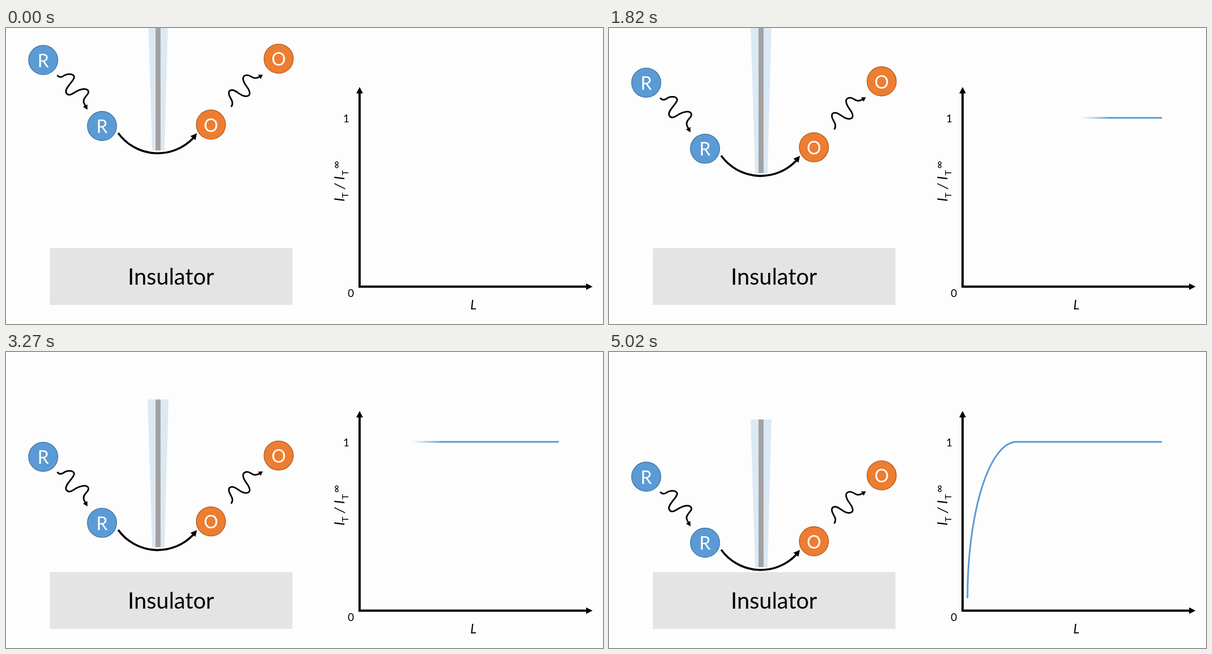
Animation, 1062 px wide and 527 px high, one loop 5.06 s. Source, as an HTML page:

```html
<!DOCTYPE html>
<html lang="en">
<head>
<meta charset="utf-8">
<title>Approach curve over an insulator</title>
<style>
  html, body { margin: 0; width: 100%; height: 100%; overflow: hidden; background: #fdfdfd; }
  svg { display: block; width: 1062px; height: 527px; font-family: Lato, "Open Sans", sans-serif; }
  .mid { text-anchor: middle; }
  .line { fill: none; stroke: #000; }
  .ball { font-size: 32px; fill: #fff; text-anchor: middle; }
  .ball circle { stroke-width: 1.3; }
  .red circle { fill: #5b9bd5; stroke: #41719c; }
  .ox circle { fill: #ed7d31; stroke: #ae5a21; }
</style>
</head>
<body>
<svg viewBox="0 0 1062 527">
  <defs>
    <linearGradient id="wipe" gradientUnits="userSpaceOnUse" y1="0" y2="0">
      <stop offset="0" stop-color="#5b9bd5" stop-opacity="0"/>
      <stop offset="1" stop-color="#5b9bd5"/>
    </linearGradient>
  </defs>

  <rect x="78" y="392" width="431.5" height="101" fill="#e4e4e4"/>
  <text class="mid" x="293.5" y="457" font-size="40">Insulator</text>

  <g id="probe">
    <path d="M252 -45H289L282 218H260Z" fill="#dbe9f4"/>
    <rect x="266" y="-45" width="9" height="263" fill="#a2a2a2"/>

    <g class="ball red" transform="translate(66.2 57)"><circle r="26"/><text y="12.5">R</text></g>
    <g class="ball red" transform="translate(170.8 174.5)"><circle r="26"/><text y="12.5">R</text></g>
    <g class="ball ox" transform="translate(364.5 172)"><circle r="26"/><text y="12.5">O</text></g>
    <g class="ball ox" transform="translate(485 54.7)"><circle r="26"/><text y="12.5">O</text></g>

    <path class="line" stroke-width="3.6" d="M199.5 187A87 87 0 0 0 333 196"/>
    <path d="M339.7 187.3L337 199.4L328 192.4Z"/>

    <path class="line" stroke-width="2.8" d="M91 84C95 89 99 88 103 85S118 80 121 86S103 107 107 115S118 117 125 113S143 106 146.3 112S135 124 138.5 133L141 138.5"/>
    <path d="M145 145.5L137 140.5L144.7 136Z"/>

    <path class="line" stroke-width="2.8" d="M400.5 140.5C405 134 402 129 399 124S394 111 402 110.5S417 122 427 121.5S434 112 428 104S418 86 427 84S438 94 451 87"/>
    <path d="M457 83L448.5 83.3L453 91Z"/>
  </g>

  <path class="line" stroke-width="4" d="M629 114V460.5H1034"/>
  <path d="M629 105L635 116.5H623ZM1043.5 460.5L1032 466.3V454.7Z"/>
  <g class="mid" font-size="19">
    <text x="605.3" y="167.5">1</text>
    <text x="613.5" y="479">0</text>
    <text x="831.5" y="500.5" font-size="23" font-style="italic">L</text>
  </g>
  <g transform="translate(602 308) rotate(-90)" font-size="25">
    <text x="-1" font-style="italic">I</text>
    <text x="5.5" y="6.5" font-size="16">T</text>
    <text x="21" font-style="italic">/</text>
    <text x="37.5" font-style="italic">I</text>
    <text x="45.5" y="6.5" font-size="16">T</text>
    <text class="mid" x="64.5" y="-8.5" font-size="19">∞</text>
  </g>

  <path fill="none" stroke="url(#wipe)" stroke-width="3" d="M983.5 160H725A87.3 278 0 0 0 637.7 438.5"/>
</svg>
<script>
  const LOOP = 5060, RUN = 5000, DROP = 165, SOFT = 52;
  const probe = document.getElementById('probe');
  const wipe = document.getElementById('wipe');

  function draw(now) {
    const p = Math.min(1, (now % LOOP) / RUN);
    const ease = p - Math.sin(2 * Math.PI * p) / (2 * Math.PI);
    const edge = 984 - 400 * p;
    probe.setAttribute('transform', `translate(0 ${DROP * ease})`);
    wipe.setAttribute('x1', edge);
    wipe.setAttribute('x2', edge + SOFT);
    requestAnimationFrame(draw);
  }
  draw(0);
</script>
</body>
</html>
```
